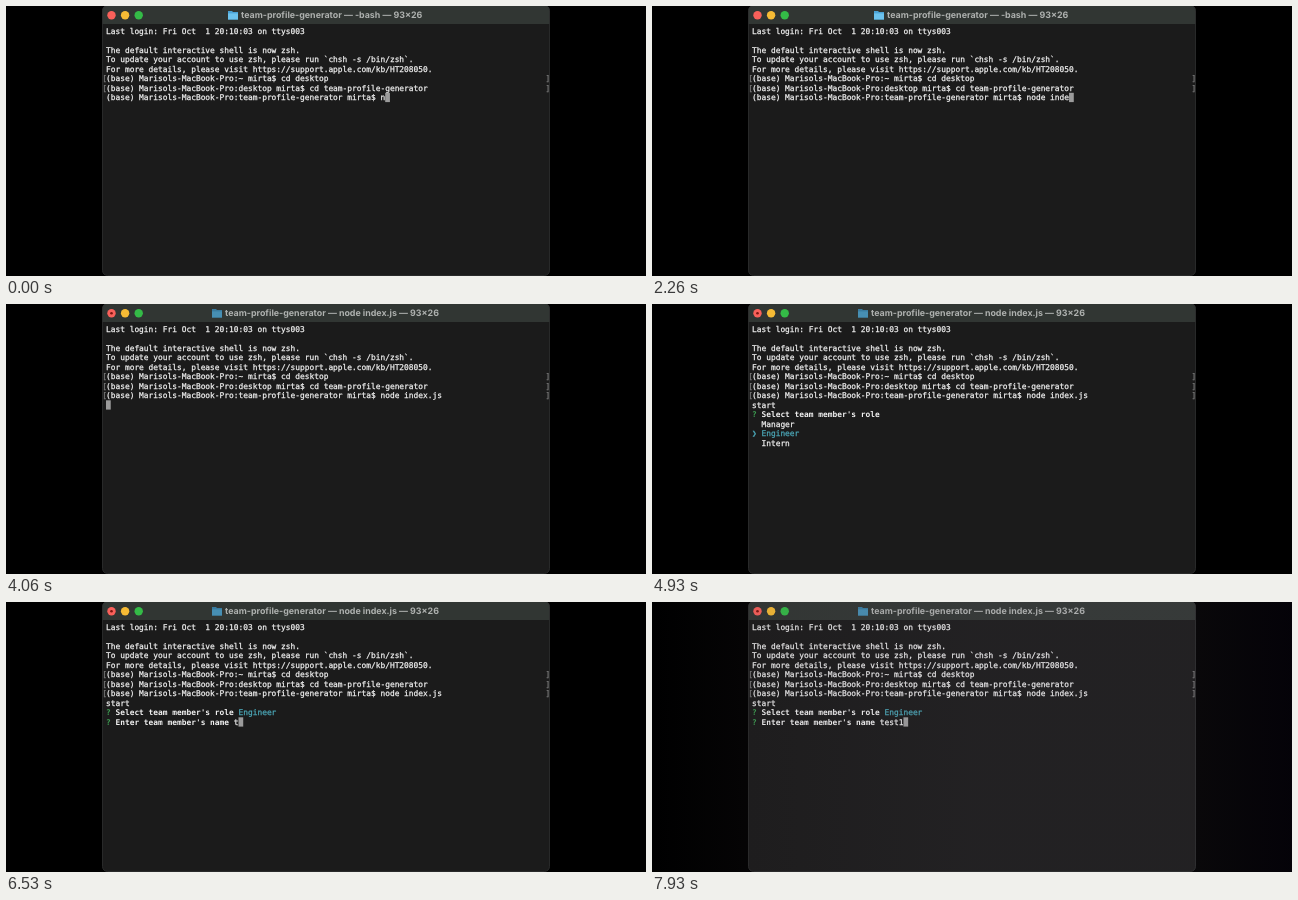
Animation of 640x270 px, one loop 8 s. Source, as an HTML page with a canvas:

```html
<!DOCTYPE html>
<html lang="en">
<head>
<meta charset="utf-8">
<title>Terminal session</title>
<style>
  html, body { margin: 0; width: 100%; height: 100%; overflow: hidden; background: #000; }
  canvas { display: block; }
</style>
</head>
<body>
<canvas id="stage" width="640" height="270"></canvas>
<script>
const ctx = document.getElementById('stage').getContext('2d');
const LOOP = 8000;
const LEFT = 100, CELL = 4.732, TOP = 27.8, ROW = 9.5;
const MONO = '7.86px "DejaVu Sans Mono", monospace';
const WHITE = '#f2f2f2', GREEN = '#3d9f52', CYAN = '#4ba8b8', GREY = '#7c7c7c';

const HOST = '(base) Marisols-MacBook-Pro:';
const USER = ' mirta$ ';
const INTRO = [
  'Last login: Fri Oct  1 20:10:03 on ttys003',
  '',
  'The default interactive shell is now zsh.',
  'To update your account to use zsh, please run `chsh -s /bin/zsh`.',
  'For more details, please visit https://support.apple.com/kb/HT208050.',
  HOST + '~' + USER + 'cd desktop',
  HOST + 'desktop' + USER + 'cd team-profile-generator'
];
const PROMPT = HOST + 'team-profile-generator' + USER;
const ROLES = ['Manager', 'Engineer', 'Intern'];

// Moments at which each key is pressed, in ms
const COMMAND_KEYS = [0, 200, 400, 600, 950, 1600, 1850, 2050, 2250, 2400, 2550, 2950, 3400];
const NAME_KEYS = [6400, 6580, 6760, 6960, 7400];
const RUN = 3850, MENU = 4330, ARROW = 4800, CHOOSE = 5130;
const FADE = 7850, FADE_LENGTH = 1000;

const typed = (text, keys, t) => text.slice(0, keys.filter(k => k <= t).length);

function write(text, row, col = 0, color = WHITE, bold = false) {
  const x = LEFT + col * CELL, y = TOP + row * ROW;
  ctx.font = (bold ? 'bold ' : '') + MONO;
  ctx.fillStyle = ctx.strokeStyle = color;
  ctx.fillText(text, x, y);
  if (bold) return;
  // A hairline outline gives the regular face a medium weight
  ctx.lineWidth = 0.25;
  ctx.strokeText(text, x, y);
}

function cursor(row, col) {
  ctx.fillStyle = '#9b9b9b';
  ctx.fillRect(LEFT + col * CELL, TOP + row * ROW - 7.5, CELL, 9.3);
}

function brackets(row) {
  write('[', row, -0.8, GREY);
  write(']', row, 92.9, GREY);
}

function question(text, row) {
  write('?', row, 0, GREEN, true);
  write(text, row, 2, WHITE, true);
}

function disc(x, y, r, color) {
  ctx.fillStyle = color;
  ctx.beginPath();
  ctx.arc(x, y, r, 0, 7);
  ctx.fill();
}

function drawWindow(running) {
  ctx.fillStyle = '#000';
  ctx.fillRect(0, 0, 640, 270);
  ctx.save();
  ctx.beginPath();
  ctx.roundRect(96.5, -0.5, 447, 270, 5);
  ctx.clip();
  ctx.fillStyle = '#1b1b1b';
  ctx.fillRect(96, 0, 448, 270);
  ctx.fillStyle = '#313633';
  ctx.fillRect(96, 0, 448, 18);
  ctx.restore();
  ctx.strokeStyle = '#303231';
  ctx.lineWidth = 0.8;
  ctx.stroke();

  ['#f9605a', '#f6bb35', '#34bb47'].forEach((c, i) => disc(105.5 + 13.6 * i, 9.2, 4.2, c));
  if (running) disc(105.5, 9.2, 1.3, '#7d1510');

  const x = running ? 206 : 222;
  ctx.fillStyle = running ? '#397b9f' : '#4aa3d6';
  ctx.fillRect(x, 5, 4.5, 3);
  ctx.fillRect(x, 6, 10, 7.5);
  ctx.fillStyle = running ? '#478fb3' : '#6cc3ee';
  ctx.fillRect(x, 7.4, 10, 6.1);

  ctx.font = 'bold 8.9px Inter, sans-serif';
  ctx.fillStyle = '#aeb1af';
  ctx.fillText(`team-profile-generator — ${running ? 'node index.js' : '-bash'} — 93×26`, x + 13, 12.4);
}

function drawMenu(t) {
  const moved = t >= ARROW;
  if (!moved) write('(Use arrow keys)', 9, 28);
  ROLES.forEach((role, i) => {
    const active = i === Number(moved);
    write((active ? '❯ ' : '  ') + role, 10 + i, 0, active ? CYAN : WHITE);
  });
}

function drawSession(t) {
  const running = t >= RUN;
  drawWindow(running);
  INTRO.forEach((line, row) => write(line, row));
  brackets(5);
  brackets(6);

  const line = PROMPT + typed('node index.js', COMMAND_KEYS, t);
  write(line, 7);
  if (!running) return cursor(7, line.length);
  brackets(7);
  if (t < MENU) return cursor(8, 0);

  write('start', 8);
  question("Select team member's role", 9);
  if (t < CHOOSE) return drawMenu(t);

  write('Engineer', 9, 28, CYAN);
  question("Enter team member's name", 10);
  const name = typed('test1', NAME_KEYS, t);
  write(name, 10, 27);
  cursor(10, 27 + name.length);
}

// The next scene, a dim violet desktop, starts to dissolve in
const desktop = ctx.createLinearGradient(0, 0, 640, 0);
desktop.addColorStop(0, '#000');
desktop.addColorStop(0.15, '#40343f');
desktop.addColorStop(0.5, '#75667c');
desktop.addColorStop(0.84, '#75667c');
desktop.addColorStop(1, '#351f66');

function drawFade(t) {
  if (t < FADE) return;
  ctx.globalAlpha = (t - FADE) / FADE_LENGTH;
  ctx.fillStyle = desktop;
  ctx.fillRect(0, 0, 640, 270);
  ctx.globalAlpha = 1;
}

function tick() {
  const t = performance.now() % LOOP;
  drawSession(t);
  drawFade(t);
  requestAnimationFrame(tick);
}

ctx.textRendering = 'geometricPrecision';
tick();
</script>
</body>
</html>
```
